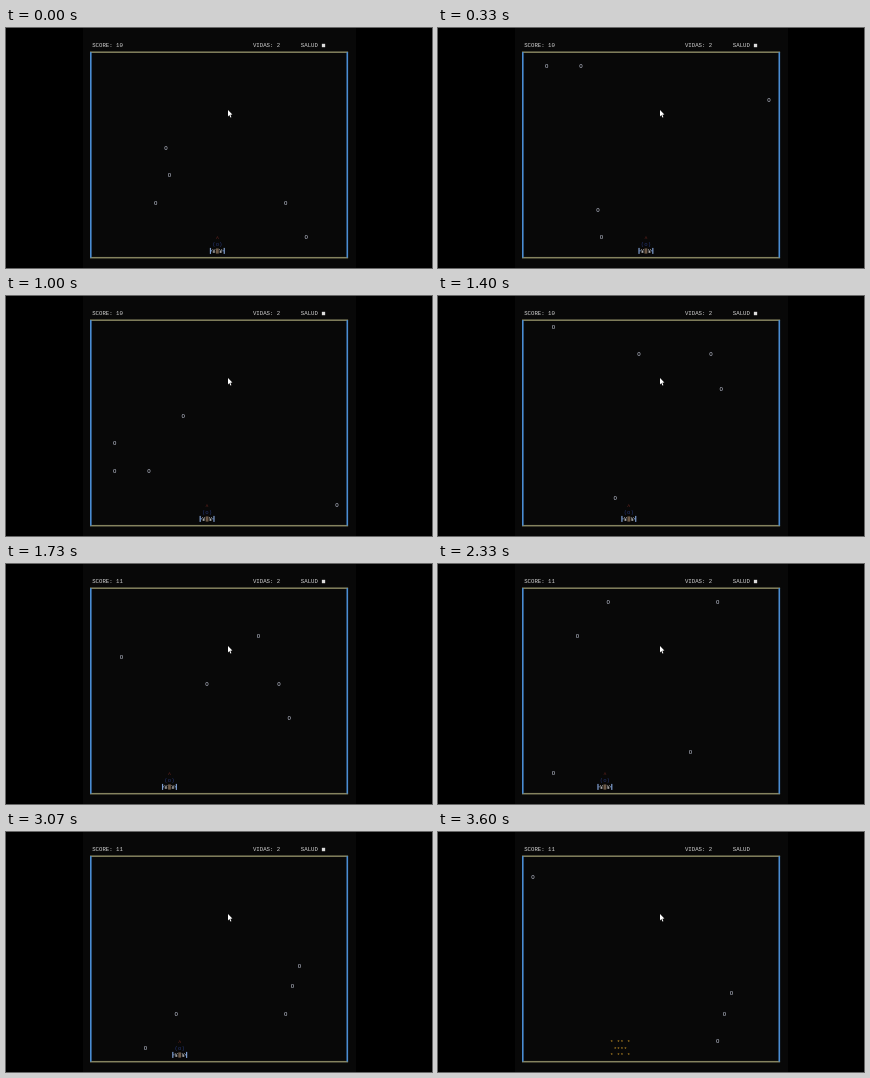
These frames come from a looping animation (426x240 px, 3.67 s). An HTML page with a canvas:

```html
<!DOCTYPE html>
<html lang="es">
<head>
<meta charset="utf-8">
<title>Asteroides</title>
<style>
  html, body { margin: 0; width: 100%; height: 100%; overflow: hidden; background: #000; }
  canvas { display: block; width: 426px; height: 240px; }
</style>
</head>
<body>
<canvas id="stage" width="426" height="240"></canvas>
<script>
const ctx = document.getElementById('stage').getContext('2d');

const LOOP = 3670, FRAME = 200 / 3;
const CELL_W = 3.42, CELL_H = 6.85;
const TOP_ROW = 4, FALL_ROWS = 29;
const HIT_STEP = 44, CRASH_STEP = 92, BLAST_SWITCH = 3400;
const INK = '#d2d2d2';

// Pairs of time in ms and value
const STEPS = [[0, .4], [600, 17.5], [1400, 41.3], [1730, 50.4], [2330, 67.5], [3070, 88.5], [3200, 92.1]];
const SHIP = [[0, 39], [280, 38], [600, 37], [760, 37], [761, 36], [1295, 36], [1400, 33],
              [1680, 25], [2000, 25], [2330, 26], [2700, 27], [3070, 28], [3200, 29]];

// Each rock falls from the top row and reappears in the next column of its list
const ROCKS = [
  { born: -13, cols: [24, 29], end: HIT_STEP },
  { born: HIT_STEP, cols: [51, 63] },
  { born: -17, cols: [25, 9, 11, 61] },
  { born: -21, cols: [21, 9, 36, 27], end: CRASH_STEP },
  { born: -21, cols: [59, 19, 57, 59] },
  { born: -26, cols: [65, 74, 60, 18, 5] }
];

const BLASTS = [
  ['  **  ', ' **** ', '  **  '],
  ['* ** *', ' **** ', '* ** *']
];

const colX = col => 84.8 + (col - 2) * CELL_W;
const rowY = row => 31 + (row - TOP_ROW) * CELL_H;

function interpolate(points, t) {
  const i = points.findIndex(p => p[0] > t);
  if (i < 0) return points[points.length - 1][1];
  const [t0, v0] = points[i - 1], [t1, v1] = points[i];
  return v0 + (v1 - v0) * (t - t0) / (t1 - t0);
}

// Drawn at a tenth of a large font so the advances stay fractional
function print(text, col, row, color = INK) {
  ctx.save();
  ctx.translate(colX(col) - CELL_W / 2, rowY(row) + 1.9);
  ctx.scale(.1, .1);
  ctx.font = '57px "Liberation Mono", monospace';
  ctx.fillStyle = color;
  ctx.fillText(text, 0, 0);
  ctx.restore();
}

function rect(x, y, w, h, color) {
  ctx.fillStyle = color;
  ctx.fillRect(x, y, w, h);
}

function drawBorder() {
  const x0 = colX(2), x1 = colX(77), y0 = rowY(3), y1 = rowY(33);
  for (const y of [y0, y1]) rect(x0 - .8, y - .7, x1 - x0 + 1.6, 1.5, '#85835f');
  for (const x of [x0, x1]) rect(x - .8, y0, 1.6, y1 - y0, '#4a8cd2');
}

function drawHud(score, healthy) {
  print('SCORE: ' + score, 2.9, 2);
  print('VIDAS: 2', 49.9, 2);
  print('SALUD', 63.9, 2);
  if (healthy) rect(colX(70) - 1.5, rowY(2) - 1.5, 3.3, 3.4, '#dcdcdc');
}

function drawShip(col) {
  const x = colX(col), y = rowY(32);
  print('^', col, 30.2, '#702820');
  print('(o)', col - 1, 31, '#25346e');
  print('¥', col - 1, 32);
  print('¥', col + 1, 32);
  rect(x - 1.4, y - 2.4, 2.8, 5.2, '#6d5a48');
  for (const side of [-1, 1]) {
    rect(x + side * 6.9 - .6, y - 2.9, 1.2, 6, '#7f9ed0');
    rect(x + side * 5.8 - .6, y - .5, 1.2, 1, '#7f9ed0');
  }
}

function drawCursor() {
  const outline = [[0, 0], [0, 6.4], [1.4, 5.1], [2.4, 7.6], [3.4, 7.2], [2.4, 4.8], [4.4, 4.6]];
  ctx.beginPath();
  outline.forEach(([x, y]) => ctx.lineTo(222 + x, 82 + y));
  ctx.closePath();
  ctx.fillStyle = '#fff';
  ctx.fill();
}

function draw(t) {
  const step = Math.min(Math.floor(interpolate(STEPS, t)), CRASH_STEP);
  const crashed = step >= CRASH_STEP;

  rect(0, 0, 426, 240, '#000');
  rect(77, 0, 273, 240, '#080808');
  drawBorder();
  drawHud(step < HIT_STEP ? 10 : 11, !crashed);

  for (const { born, cols, end = Infinity } of ROCKS) {
    if (step < born || step >= end) continue;
    const age = step - born;
    print('O', cols[Math.floor(age / FALL_ROWS)], TOP_ROW + age % FALL_ROWS, '#c4c9da');
  }

  if (crashed) {
    const blast = BLASTS[t < BLAST_SWITCH ? 0 : 1];
    blast.forEach((line, i) => print(line, 28, 30.1 + i, '#d09a28'));
  } else {
    drawShip(Math.round(interpolate(SHIP, t)));
  }
  drawCursor();
}

const start = performance.now();
function tick() {
  const t = (performance.now() - start) % LOOP;
  const frame = Math.floor(t / FRAME + .06);
  draw(Math.min(Math.round(frame * FRAME / 10) * 10, 3600));
  requestAnimationFrame(tick);
}
tick();
</script>
</body>
</html>
```
